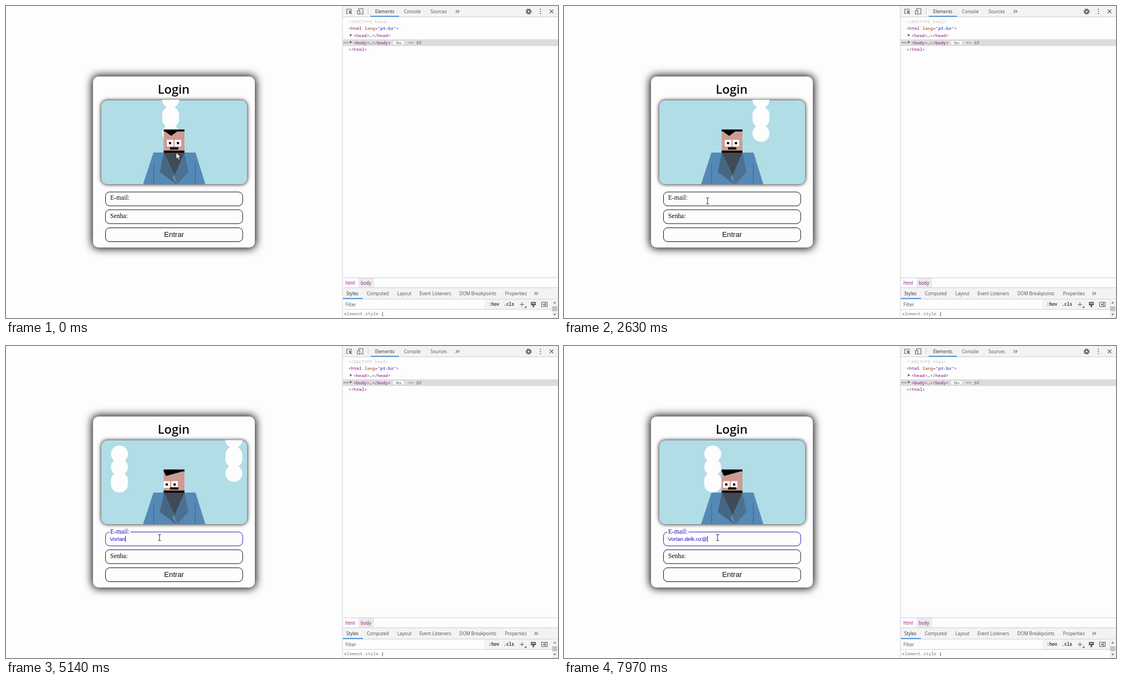
These frames come from a looping animation (996 px wide and 562 px high, 8000 ms). An HTML page:

```html
<!DOCTYPE html>
<html lang="pt-br">
<head>
<meta charset="utf-8">
<title>Login</title>
<style>
  html, body { margin: 0; width: 100%; height: 100%; overflow: hidden; background: #fdfdfd; }
  #card, #photo { position: absolute; box-sizing: border-box; }
  #card { left: 157px; top: 127px; width: 292px; height: 308px; border-radius: 10px;
    background: #fdfdfd; box-shadow: 0 0 15px 2px #0b0814; }
  #photo { left: 171.5px; top: 169.5px; width: 263.5px; height: 151.5px; border-radius: 11px;
    background: #b0dde6; box-shadow: 0 0 7px #000; }
  svg { position: absolute; left: 0; top: 0; width: 996px; height: 562px; display: block; }
  text { white-space: pre; }

  .ui { font: 8.1px "Open Sans", "Noto Sans", sans-serif; fill: #4c5055; }
  .code { font: 7.98px "Noto Sans Mono", "DejaVu Sans Mono", monospace; }
  .tag { fill: #881280; }
  .bar { fill: #f2f3f4; }
  .rule { stroke: #cdd0d4; fill: none; }
  .icon { stroke: #5f6368; fill: none; stroke-width: 1.1; }
  .solid { fill: #5f6368; }
  .field { fill: none; stroke: #111; }
  .label { font: 11.63px "Liberation Serif", "Times New Roman", serif; }
  .input { font: 9.7px "Liberation Sans", Arial, sans-serif; fill: #1c10c4; }
  .cloud { fill: #fdfdfd; }

  #cloudA { animation: driftA 8s linear infinite; }
  #cloudB { animation: driftB 8s linear infinite; }
  @keyframes driftA { from { transform: translateX(297px); } to { transform: translateX(474.6px); } }
  @keyframes driftB { from { transform: translateX(89px); } to { transform: translateX(269px); } }

  #pointer { animation: roam 8s ease-in-out infinite; }
  #arrow { animation: overField 8s step-end infinite reverse; animation-direction: normal; }
  #beam { animation: inField 8s step-end infinite; }
  @keyframes roam {
    0%, 1% { transform: translate(307px, 264px); }
    10% { transform: translate(420px, 205px); }
    18.5%, 21% { transform: translate(516px, 165px); }
    31%, 34.5% { transform: translate(259px, 351px); }
    38%, to { transform: translate(277px, 345px); }
  }
  @keyframes overField { 0% { opacity: 1; } 30% { opacity: 0; } to { opacity: 0; } }
  @keyframes inField { 0% { opacity: 0; } 30% { opacity: 1; } to { opacity: 1; } }
</style>
</head>
<body>
<div id="card"></div>
<div id="photo"></div>
<svg viewBox="0 0 996 562">
  <defs>
    <clipPath id="frame"><rect x="171.5" y="169.5" width="263.5" height="151.5" rx="11"/></clipPath>
  </defs>

  <text x="302.5" y="158" text-anchor="middle" fill="#0c0c10"
    style="font: 600 22px 'Open Sans', 'Noto Sans', sans-serif">Login</text>

  <g clip-path="url(#frame)">
    <g id="cloudA" class="cloud">
      <circle cy="169" r="15.3"/>
      <rect x="-15.3" y="181" width="30.6" height="38" rx="15"/>
      <circle cy="229.5" r="15.3"/>
    </g>
    <g id="cloudB" class="cloud">
      <circle cy="194.5" r="15.3"/>
      <circle cy="218" r="15.3"/>
      <rect x="-15.3" y="227" width="30.6" height="37" rx="15"/>
    </g>

    <path d="M266 264H342L360 322H247Z" fill="#5589b6"/>
    <path d="M266.500 283V322M341.500 283V322" stroke="#3b648a"/>
    <path d="M285 264L277.500 299 307 321 303 304Z" fill="#466783"/>
    <path d="M322 264L329 299 309 321 303 304Z" fill="#4c7090"/>
    <path d="M303 304L300.500 310 308 320Z" fill="#5f91bb"/>
    <path d="M285 264H322L304 305Z" fill="#3f4b57"/>
    <rect x="284.500" y="222.500" width="37.500" height="42" fill="#cd9b94"/>
    <path id="hair"/>
    <rect x="284.500" y="260.500" width="37.500" height="4"/>
    <g id="eyes">
      <path d="M290.300 241h11.800v12h-11.800zM304.300 241h11.800v12h-11.800z" fill="#fdfdfd"/>
      <path d="M294 245h4v4h-4zM308.300 245h4v4h-4z"/>
    </g>
    <rect x="296" y="254.500" width="15" height="4"/>
  </g>

  <rect id="mailBox" class="field" x="179.500" y="335" width="247.500" height="25" rx="7.500"/>
  <rect class="field" x="179.500" y="367" width="247.500" height="25" rx="7.500"/>
  <rect class="field" x="179.500" y="399.500" width="247.500" height="25" rx="7.500"/>
  <g id="mailLabel">
    <rect x="186.500" y="340" width="38" height="12" fill="#fdfdfd"/>
    <text class="label" x="188" y="349">E-mail:</text>
  </g>
  <text class="label" x="188" y="381.500">Senha:</text>
  <text x="303.300" y="415.700" text-anchor="middle" fill="#111"
    style="font: 13.200px 'Liberation Sans', Arial, sans-serif">Entrar</text>
  <text id="mail" class="input" x="187.500" y="350.700"></text>
  <rect id="caret" y="342" width="1" height="11" fill="#1c10c4"/>

  <!-- developer tools -->
  <rect x="607" width="389" height="562" fill="#fdfdfd"/>
  <rect class="bar" x="607" width="389" height="19"/>
  <rect x="607" y="60" width="389" height="12" fill="#dcdcdb"/>
  <rect x="636" y="490" width="28" height="17" fill="#ebebeb"/>
  <rect class="bar" x="607" y="507.500" width="389" height="20.500"/>
  <rect class="bar" x="863" y="528" width="133" height="18"/>
  <path class="rule" d="M607 0V562M607 19.500H996M653.500 4V15M607 489.500H996M607 507.500H996M607 528H996M607 546.500H996"/>
  <path d="M658 18.500H709M608 526.800H644" stroke="#2f7bd0" stroke-width="1.600"/>

  <g class="ui">
    <text x="666" y="13" fill="#2a2c30">Elements</text>
    <text x="718" y="13">Console</text>
    <text x="766" y="13">Sources</text>
    <text x="612.500" y="501.500" class="tag">html</text>
    <text x="640" y="501.500" class="tag">body</text>
    <text x="614" y="521" fill="#2a2c30">Styles</text>
    <text x="651" y="521">Computed</text>
    <text x="706" y="521">Layout</text>
    <text x="746" y="521">Event Listeners</text>
    <text x="818" y="521">DOM Breakpoints</text>
    <text x="900.500" y="521">Properties</text>
    <text x="612.500" y="540.500">Filter</text>
  </g>

  <path class="icon" d="M811.500 7l2.500 2.700-2.500 2.700M815 7l2.500 2.700-2.500 2.700M953.500 515l2.500 2.700-2.500 2.700M957 515l2.500 2.700-2.500 2.700"/>
  <path class="icon" d="M618 13.500H614.700V5.700H623V9M636.500 8V4.700H644V14.500H640M634 8.500H638.500V14.500H634Z"/>
  <path class="solid" d="M618.500 8l6 2.500-2.300 1 2.200 2.500-1 1-2.300-2.500-1 2.300z"/>
  <circle class="icon" cx="943" cy="10" r="3" style="stroke-width:2.400"/>
  <circle class="icon" cx="943" cy="10" r="4.800" stroke-dasharray="1.900 1.870" style="stroke-width:1.600"/>
  <path class="solid" d="M963.300 5h1.800v1.800h-1.800zM963.300 9h1.800v1.800h-1.800zM963.300 13h1.800v1.800h-1.800z"/>
  <path class="icon" d="M981 6.500l6.500 6.500M987.500 6.500l-6.500 6.500"/>

  <g class="code">
    <text x="618" y="31" fill="#c0c0c0">&lt;!DOCTYPE html&gt;</text>
    <text x="618" y="43.300" class="tag">&lt;html <tspan fill="#994500">lang</tspan>="<tspan fill="#1a1aa6">pt-br</tspan>"&gt;</text>
    <text x="627" y="56" class="tag">&lt;head&gt;<tspan fill="#333">…</tspan>&lt;/head&gt;</text>
    <text x="627" y="68.800" class="tag">&lt;body&gt;<tspan fill="#333">…</tspan>&lt;/body&gt;</text>
    <text x="618" y="81" class="tag">&lt;/html&gt;</text>
    <text x="725" y="68.800" fill="#777" font-style="italic">== $0</text>
    <text x="871" y="540.300" fill="#3c4043" font-weight="600">:hov</text>
    <text x="898" y="540.300" fill="#3c4043" font-weight="600">.cls</text>
    <text x="610" y="557" fill="#777">element.style <tspan fill="#222">{</tspan></text>
  </g>
  <rect x="697.500" y="62.300" width="21.500" height="8" rx="4" fill="#fdfdfd" stroke="#c5c8cc" stroke-width=".7"/>
  <text class="ui" x="708.300" y="68.500" text-anchor="middle" style="font-size:6.200px">flex</text>
  <path class="solid" d="M620.500 50l4 2.500-4 2.500zM620.500 62.500l4 2.500-4 2.500zM609.500 65.300h1.700v1.700h-1.700zM612.700 65.300h1.700v1.700h-1.700zM615.900 65.300h1.700v1.700h-1.700z"/>

  <path class="icon" d="M931 533.500V541.500M927 537.500H935M966.500 533.500H976.500V541.500H966.500ZM973.500 533.500V541.500"/>
  <path class="solid" d="M939 540v4h-4zM972 535v5l-3.500-2.500zM947 533h9v6h-3v3.500h-3v-3.500h-3z"/>
  <path d="M948.500 535.500H954.500" stroke="#f2f3f4"/>
  <rect x="985" y="528" width="11" height="34" fill="#f1f1f1"/>
  <rect x="985.500" y="541" width="9" height="8.500" fill="#c1c1c1"/>
  <path class="solid" d="M987.500 535.500h5l-2.500-2.800zM987.500 554.500h5l-2.500 2.800z"/>

  <g id="pointer">
    <path id="arrow" d="M0 0V11.500L2.700 9 4.700 13.500 6.600 12.600 4.700 8.300H8.200Z" fill="#fff" stroke="#222" stroke-width=".8"/>
    <path id="beam" d="M-2.500 -5.500H-.8L0 -4.800 .8 -5.500H2.500M0 -5V5M-2.500 5.500H-.8L0 4.800 .8 5.500H2.500" fill="none" stroke="#222"/>
  </g>
</svg>

<script>
  const LOOP = 8000, FOCUS = 3050, SLIDE = 250;
  const address = "Vorlan.delk.oz@";
  const keyTimes = [3600, 4080, 4300, 4520, 4760, 4980, 5500, 5840,
                    6020, 6220, 6420, 6680, 6930, 7420, 7830];
  const $ = id => document.getElementById(id);
  const mix = (a, b, k) => a + (b - a) * k;
  let start;

  function draw(t) {
    const raw = Math.min(1, Math.max(0, (t - FOCUS) / SLIDE));
    const k = raw * raw * (3 - 2 * raw);
    const focused = t >= FOCUS;
    const typed = keyTimes.filter(time => time <= t).length;

    $("mail").textContent = address.slice(0, typed);
    $("caret").setAttribute("x", 187.5 + (typed ? $("mail").getComputedTextLength() : 0));
    const lastKey = typed ? keyTimes[typed - 1] : FOCUS;
    const lit = focused && (t - lastKey) % 1000 < 500;
    $("caret").setAttribute("opacity", lit ? 1 : 0);

    $("mailBox").style.stroke = focused ? "#2a14b4" : "#111";
    $("mailLabel").style.fill = focused ? "#2a14b4" : "#111";
    $("mailLabel").setAttribute("transform", `translate(0 ${-11.3 * k})`);

    const gaze = (-7.9 + 0.31 * typed) * k;
    $("eyes").setAttribute("transform", `translate(${gaze} ${2.5 * k})`);
    const left = mix(287, 284.5, k), tip = mix(298, 289, k), right = mix(309, 318, k);
    $("hair").setAttribute("d",
      `M284.5 222.500H322V226H${right}L${tip} 234 ${left} 226H284.500Z`);
  }

  function tick(now) {
    start ??= now;
    draw((now - start) % LOOP);
    requestAnimationFrame(tick);
  }
  draw(0);
  requestAnimationFrame(tick);
</script>
</body>
</html>
```
